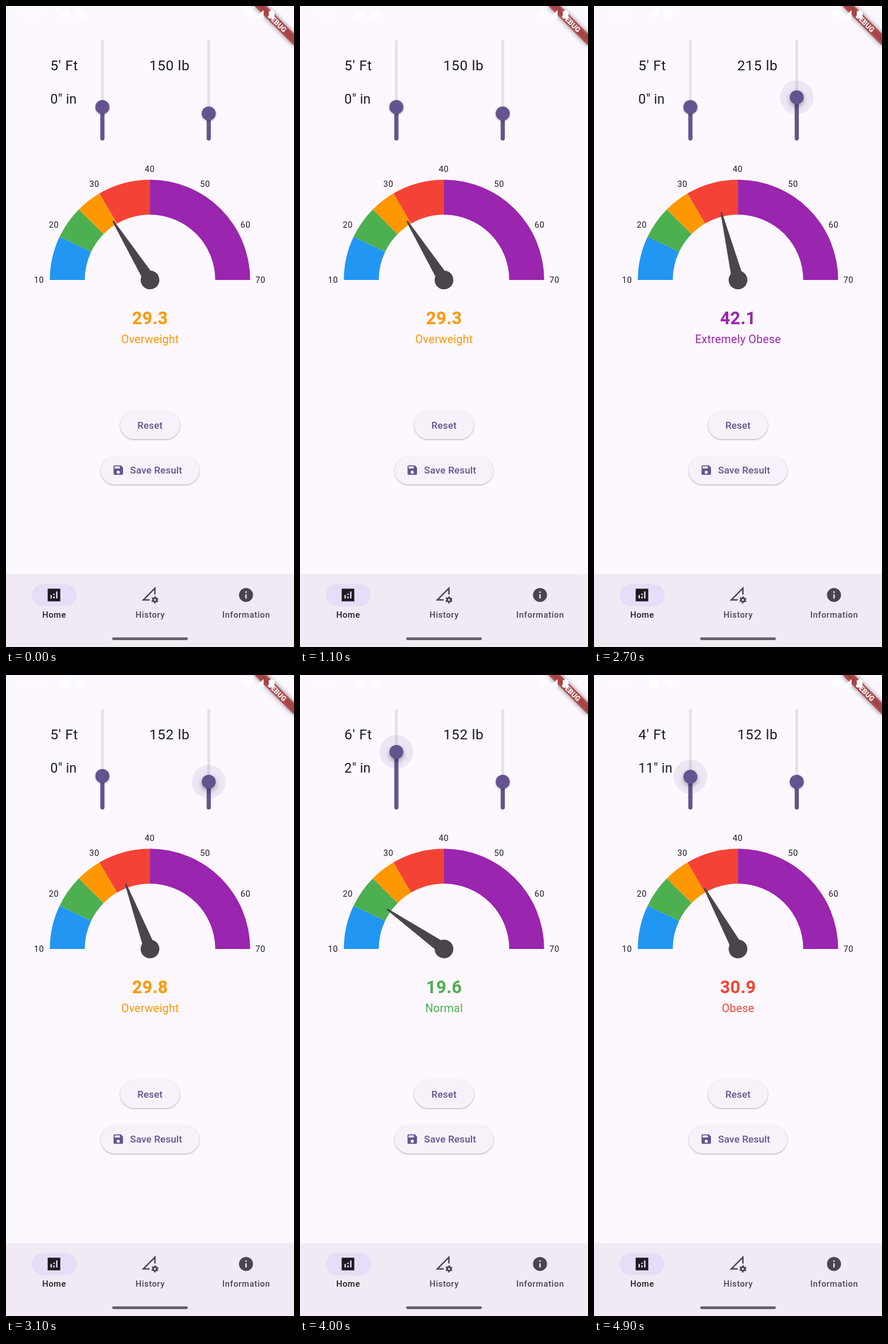
An HTML page that plays this animation: 502x1116 px, repeating every 5000 ms.

```html
<!DOCTYPE html>
<html lang="en">
<head>
<meta charset="utf-8">
<title>BMI gauge</title>
<style>
  html, body { margin: 0; width: 100%; height: 100%; overflow: hidden; background: #fdf7ff; }
  svg { display: block; width: 502px; height: 1116px; font-family: Roboto, sans-serif; }
  .mid { text-anchor: middle; }
  .input { font-size: 24.4px; letter-spacing: .61px; fill: #1d1b20; }
  .small { font-size: 23.2px; letter-spacing: .3px; }
  .tick { font-size: 14.64px; letter-spacing: .49px; fill: #1d1b20; }
  .button { font-size: 17.1px; font-weight: 500; letter-spacing: .12px; fill: #65538f; }
  .nav { font-size: 14.64px; font-weight: 500; letter-spacing: .61px; }
  .pill { fill: #f7f2fa; filter: drop-shadow(0 1px 1px #0003) drop-shadow(0 1px 1.5px #0002); }
</style>
</head>
<body>
<svg viewBox="0 0 502 1116">
  <defs>
    <filter id="blur" x="-50%" y="-100%" width="200%" height="300%"><feGaussianBlur stdDeviation="3.6"/></filter>
  </defs>
  <rect width="502" height="1116" fill="#fdf7ff"/>

  <text class="input" id="feet" x="77.3" y="111.5"/>
  <text class="input small" id="inches" x="77.3" y="170.3"/>
  <text class="input" id="pounds" x="249.8" y="111.5"/>
  <g id="sliders"></g>

  <g id="gauge"></g>
  <g id="needle" fill="#49454b">
    <path d="M129.7 475.7 L251 466.5 V487.5 L129.7 478.3Z"/>
    <circle cx="251" cy="477" r="16.3"/>
  </g>
  <g id="result" class="mid">
    <text id="bmi" x="251.1" y="554" font-size="30.5" font-weight="700" letter-spacing=".3"/>
    <text id="label" x="251.1" y="587.3" font-size="19.5" letter-spacing=".3"/>
  </g>

  <rect class="pill" x="199" y="705" width="104" height="49" rx="24.5"/>
  <text class="button mid" x="251" y="736.2">Reset</text>
  <rect class="pill" x="165" y="784" width="172" height="49" rx="24.5"/>
  <path transform="translate(184.7 797) scale(.915)" fill="#65538f" d="M17 3H5a2 2 0 0 0-2 2v14a2 2 0 0 0 2 2h14a2 2 0 0 0 2-2V7zM12 19a3 3 0 1 1 0-6 3 3 0 0 1 0 6zM15 9H5V5h10z"/>
  <text class="button" x="216.3" y="814.3">Save Result</text>

  <rect y="989.5" width="502" height="127" fill="#f1e9f3"/>
  <rect x="45" y="1006.2" width="78" height="39" rx="19.5" fill="#e7ddf8"/>
  <g transform="translate(69 1010.8) scale(1.22)" fill="#1d1b20">
    <path fill-rule="evenodd" d="M3 3h18v18H3zM7 12h2v5H7zM11 14h2v3h-2zM11 10h2v2h-2zM15 7h2v10h-2z"/>
  </g>
  <g transform="translate(236.4 1010.8) scale(1.22)" fill="#49454f">
    <path d="M11.5 20H0L20 0v11.5l-2-.2V4.83L4.83 18h6.7z"/>
    <g fill="none" stroke="#49454f">
      <circle cx="19" cy="19" r="2.7" stroke-width="2.4"/>
      <circle cx="19" cy="19" r="4.3" stroke-width="1.6" stroke-dasharray="2.2 2.303" stroke-dashoffset="-1.15"/>
    </g>
  </g>
  <path transform="translate(403.7 1010.8) scale(1.22)" fill="#49454f" fill-rule="evenodd" d="M12 2a10 10 0 1 0 0 20 10 10 0 0 0 0-20zM11 11h2v6h-2zM11 7h2v2h-2z"/>
  <g class="nav mid">
    <text x="84" y="1064.8" fill="#1d1b20">Home</text>
    <text x="251.3" y="1064.8" fill="#49454f">History</text>
    <text x="418.8" y="1064.8" fill="#49454f">Information</text>
  </g>
  <rect x="185" y="1099.2" width="132" height="4.8" rx="2.4" fill="#655f69"/>

  <g transform="translate(502 0) rotate(45) scale(1.22)">
    <rect x="-40" y="28" width="80" height="12" opacity=".5" filter="url(#blur)"/>
    <rect x="-40" y="28" width="80" height="12" fill="#b71c1c" opacity=".63"/>
    <text class="mid" y="37.6" font-size="10.2" font-weight="900" fill="#fff">DEBUG</text>
  </g>
  <g fill="#fff">
    <text x="22" y="20" font-size="17" font-weight="500">10:52</text>
    <circle cx="104" cy="14.5" r="7.5"/>
    <rect x="124" y="8" width="14" height="13" rx="3"/>
    <path d="M415 11q9-8 18 0l-9 11zM434 21.5h15V7z"/>
    <path d="M458 9h3V7h4v2h3v13h-10z"/>
  </g>
</svg>
<script>
const $ = id => document.getElementById(id);
const bands = [
  [18.5, '#2196f3', 'Underweight'],
  [24.9, '#4caf50', 'Normal'],
  [29.9, '#ff9800', 'Overweight'],
  [40, '#f44336', 'Obese'],
  [70, '#9a25ae', 'Extremely Obese']
];
const angle = value => (value - 10) * 3;
const polar = (value, r, cx = 251) => {
  const a = angle(value) * Math.PI / 180;
  return [cx - r * Math.cos(a), 477 - r * Math.sin(a)];
};

let start = 10, art = '';
for (const [end, color] of bands) {
  art += `<path fill="${color}" d="M${polar(start, 174.6)}A174.6 174.6 0 0 1 ${polar(end, 174.6)}` +
    `L${polar(end, 113.7)}A113.7 113.7 0 0 0 ${polar(start, 113.7)}Z"/>`;
  start = end;
}
for (let v = 10; v <= 70; v += 10) {
  const [x, y] = polar(v, 193, 250.4);
  art += `<text class="tick mid" x="${x}" y="${y + 5.2}">${v}</text>`;
}
$('gauge').innerHTML = art;

const slider = (id, x) => `<g id="${id}" stroke-linecap="round">
  <path class="rest" stroke="#e6e0e8" stroke-width="4.9"/>
  <path class="fill" stroke="#65538f" stroke-width="7.3"/>
  <circle class="halo" cx="${x}" r="29.3" fill="#65538f" opacity=".1"/>
  <circle class="thumb" cx="${x}" r="12.2" fill="#65538f"/></g>`;
$('sliders').innerHTML = slider('height', 168) + slider('weight', 353.4);

function setSlider(id, x, y, held) {
  const part = name => $(id).querySelector('.' + name);
  part('rest').setAttribute('d', `M${x} 61.3V${y}`);
  part('fill').setAttribute('d', `M${x} ${y}V230.6`);
  part('halo').setAttribute('cy', y);
  part('halo').style.display = held ? '' : 'none';
  part('thumb').setAttribute('cy', y);
  part('thumb').style.filter = held
    ? 'drop-shadow(0 4px 4.5px #0005)' : 'drop-shadow(0 1px 1.5px #0005)';
}

// Drag values, one per 100 ms step, holding the last one.
const drag = (first, values, rest) => step =>
  step < first ? rest : values[Math.min(step - first, values.length - 1)];
const weightAt = drag(26, [170, 215.6, 225, 190, 160, 152.8], 150);
const heightAt = drag(37, [66, 71, 74, 74, 74, 74, 74, 66, 60, 58.5, 58.2, 59.2, 59.6], 60);
const bmiAt = step => weightAt(step) * 703 / Math.floor(heightAt(step)) ** 2;

// The needle trails the value.
const needle = [bmiAt(0)];
for (let i = 1; i < 50; i++) needle[i] = needle[i - 1] + (bmiAt(i) - needle[i - 1]) * .4;

function draw(step) {
  const w = weightAt(step), h = heightAt(step), inches = Math.floor(h), bmi = bmiAt(step);
  const [, color, label] = bands.find(b => bmi < b[0]);
  $('feet').textContent = Math.floor(inches / 12) + "' Ft";
  $('inches').textContent = inches % 12 + '" in';
  $('pounds').textContent = Math.floor(w) + ' lb';
  setSlider('height', 168, 175.9 - (h - 60) * 3, step >= 37);
  setSlider('weight', 353.4, 187.2 - (w - 150) * .431, step >= 25 && step < 33);
  $('needle').setAttribute('transform', `rotate(${angle(needle[step])} 251 477)`);
  $('bmi').textContent = bmi.toFixed(1);
  $('label').textContent = label;
  $('result').setAttribute('fill', color);
}

let shown = -1;
function tick() {
  const step = Math.floor(performance.now() % 5000 / 100);
  if (step !== shown) draw(shown = step);
  requestAnimationFrame(tick);
}
tick();
</script>
</body>
</html>
```
